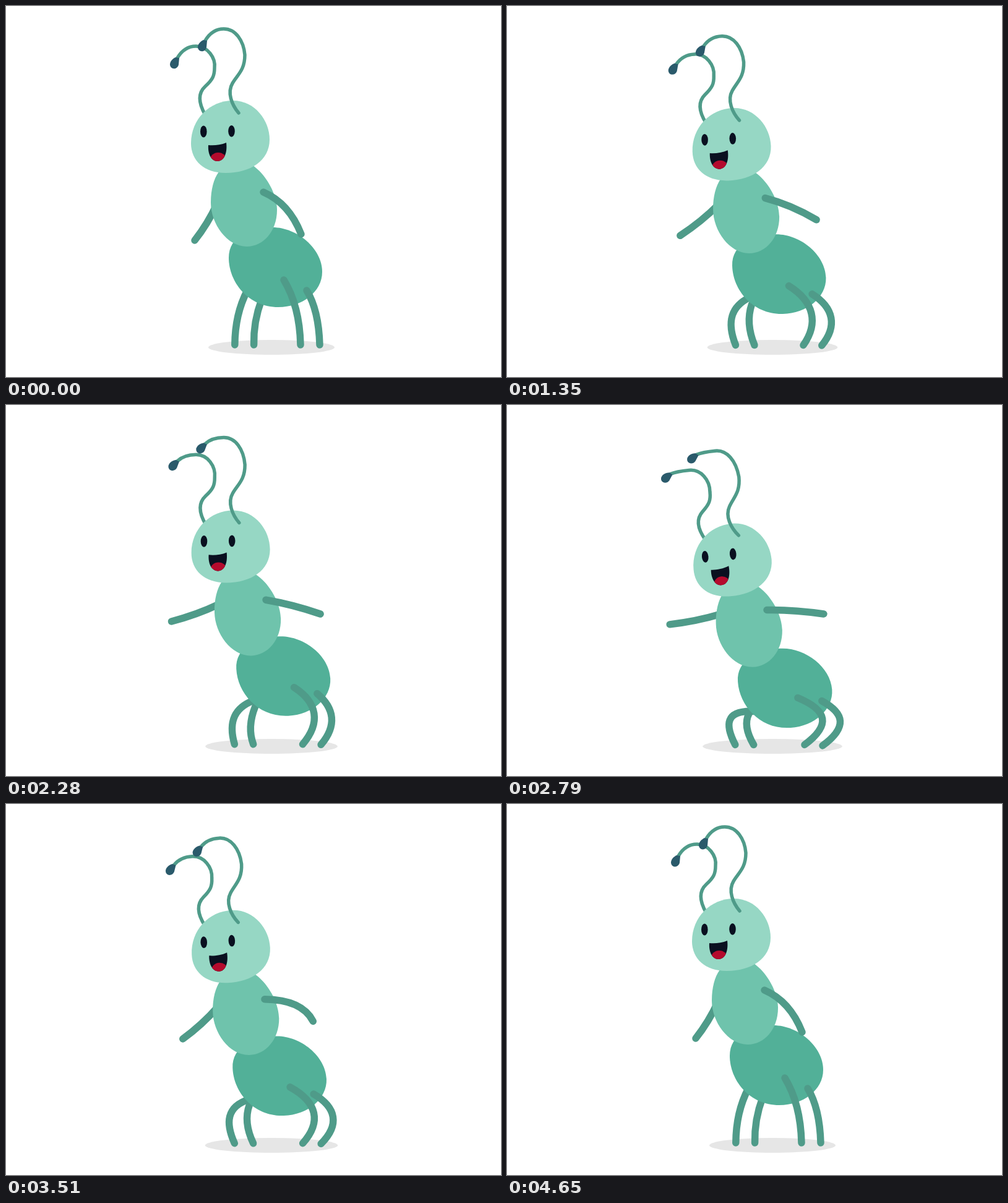
An HTML page with a canvas that plays this animation: 800x600 px, repeating every 4680 ms.

```html
<!DOCTYPE html>
<html>
<head>
<meta charset="utf-8">
<style>
html, body { margin: 0; width: 100%; height: 100%; overflow: hidden; background: #fff; }
canvas { display: block; }
</style>
</head>
<body>
<canvas id="stage" width="800" height="600"></canvas>
<script>
const ctx = document.getElementById('stage').getContext('2d');
const LOOP = 4680, STEP = 30;
const LIMB = '#4f9b89', DARK = '#0a1020', TIP = '#2a5a6b';

// Squat depth: [time, depth], eased between extremes
const SQUATS = [[0, 0], [210, .95], [530, -.15], [1050, 0], [1100, 0], [1250, 1], [1410, 0],
  [1625, 1], [1838, 0], [2015, 1], [2192, 0], [2382, 1], [2580, 0], [2775, 1],
  [2950, 0], [3110, 1], [3260, 0], [3415, 1], [3600, 0], [LOOP, 0]];

const ABDOMEN = new Path2D('M360 407C360 372 395 358 431 358C470 358 511 392 511 430C511 462 479 487 440 487C392 487 360 447 360 407Z');
const THORAX = new Path2D('M331 318C331 275 350 252 374 250C405 248 438 295 438 330C438 364 416 389 389 389C357 389 331 352 331 318Z');
const HEAD = new Path2D('M299 222C299 183 329 153 367 153C402 153 426 185 426 216C426 250 395 270 355 270C320 270 299 250 299 222Z');
const MOUTH = new Path2D('M327 225C335 226 347 225 356 221C358 237 353 251 342 251C331 251 326 238 327 225Z');
const BULB = new Path2D('M-3 -1L3 0L2 11C0 19-11 20-12 11C-12 5-7 1-3 -1Z');

function ramp(t, from, to) {
  const p = Math.min(1, Math.max(0, (t - from) / (to - from)));
  return (1 - Math.cos(Math.PI * p)) / 2;
}

function depthAt(t) {
  const i = Math.max(1, SQUATS.findIndex(key => key[0] >= t));
  const [t0, d0] = SQUATS[i - 1], [t1, d1] = SQUATS[i];
  return d0 + (d1 - d0) * ramp(t, t0, t1);
}

function fill(path, color) {
  ctx.fillStyle = color;
  ctx.fill(path);
}

function oval(x, y, rx, ry, color) {
  ctx.fillStyle = color;
  ctx.beginPath();
  ctx.ellipse(x, y, rx, ry, 0, 0, 7);
  ctx.fill();
}

function line(d, width) {
  ctx.strokeStyle = LIMB;
  ctx.lineWidth = width;
  ctx.lineCap = 'round';
  ctx.stroke(new Path2D(d));
}

function placed(dx, dy, degrees, cx, cy, draw) {
  ctx.save();
  ctx.translate(cx + dx, cy + dy);
  ctx.rotate(degrees * Math.PI / 180);
  ctx.translate(-cx, -cy);
  draw();
  ctx.restore();
}

// The last bend of an antenna rises and uncurls by lift
function antenna(stem, topX, restY, lift) {
  const topY = restY - lift * .2;
  const x = topX - 30, y = topY + 19 - lift * .85;
  line(`${stem}C${topX + 32} ${topY + 19} ${topX + 19} ${topY} ${topX} ${topY}
    C${topX - 14} ${topY} ${topX - 24} ${topY + 9 - lift * .42} ${x} ${y}`, 5.5);
  placed(x, y, lift * 1.5, 0, 0, () => fill(BULB, TIP));
}

function draw(t) {
  const d = depthAt(t);
  const r = d > 0 ? d ** .45 : d;
  const s = ramp(t, 1110, 1750) - ramp(t, 3280, 3730);
  const arms = ramp(t, 250, 520) - ramp(t, 650, 1020) + ramp(t, 1110, 1470) - ramp(t, 3300, 3760);
  const drop = t > 3000 ? 4 * s * (1 - s) : 0;
  const lift = 20 * depthAt(Math.min(LOOP, t + 10));
  const inHead = part => placed(1.5 * d, 39.5 * d, 4.2 * s - 9 * d, 363, 211.5, part);

  ctx.fillStyle = '#fff';
  ctx.fillRect(0, 0, 800, 600);
  oval(429, 552, 102 + 11 * d, 12, '#e6e6e6');

  inHead(() => placed(0, 0, -.06 * lift, 322, 176, () =>
    antenna('M322 176C311 157 310 141 322 130C334 119 337 113 337 100', 307, 65, lift)));

  // Far arm and far legs
  const sx = 341 + 3 * s, sy = 320 - 11 * arms + 30 * d;
  const hx = 305 - 34 * arms ** 1.4 - 8 * d, hy = 379 - 33 * arms ** 4 + 9 * d;
  line(`M${sx} ${sy}Q${(sx + hx) / 2 + 3} ${(sy + hy) / 2 + 3} ${hx} ${hy}`, 11.5);
  line(`M${390 + 13 * s - 5 * d} ${460 + 3 * s + 33 * d}
    C${377 + 15 * s - 40 * r} ${485 + 4 * s + 5 * d} ${370 + 10 * s - 28 * r} ${515 + 4 * s - 2 * d} ${369.8 - d} ${548 + 1.5 * d}`, 11.5);
  line(`M${413 + 16 * s - 38 * r} ${475 + 4 * s + 20 * d}
    C${404 + 13 * s - 33 * r} ${499 + 8 * s + 5 * d} ${400 + 6 * s - 19 * r} ${524 + 6 * s} ${400.6 - 2 * d} ${548 + 1.5 * d}`, 11.5);

  placed(12 * s + 2 * d, 36 * d, -2 * s - 2 * d, 436, 422, () => fill(ABDOMEN, '#52b098'));

  // Near legs
  line(`M${449 + 13 * s + 8 * d} ${443 + 31 * d}
    C${466 + 3 * s + 50 * r} ${471 + 23 * d} ${475 + 49 * r} ${506 + 12 * r} ${476 + 5 * r} ${548 + 1.5 * d}`, 11.5);
  line(`M${486 + 12 * s + 11 * d} ${460 - 3 * s + 22 * d}
    C${500 - 4 * s + 50 * r} ${483 + 16 * d} ${506 - 6 * s + 51 * r} ${513 + 8 * r} ${507 + 3 * r} ${548 + 3 * d}`, 11.5);

  placed(5.5 * s + 1.2 * d, 34 * d + 1.5 * s, -s, 384, 320, () => fill(THORAX, '#6fc3ac'));

  inHead(() => {
    fill(HEAD, '#96d7c4');
    oval(319.3, 203, 5.3, 9.4, DARK);
    oval(364.5, 202.3, 5.3, 9.4, DARK);
    fill(MOUTH, DARK);
    ctx.save();
    ctx.clip(MOUTH);
    oval(343, 248.5, 13, 11.5, '#b40a2d');
    ctx.restore();
    placed(0, 0, -.06 * lift, 376, 173, () =>
      antenna('M376 173C365 160 357 140 366 125C374 111 386 104 386 79', 352, 37, lift));
  });

  // Near arm
  line(`M${416 + 4 * s} ${301 + 30 * d + s}
    Q${457.5 + 6 * s + 18 * drop} ${319 - 3 * arms + 15 * d - 8 * drop} ${477 + 28 * arms + 7 * d} ${369 - 31 * arms}`, 11.5);
}

const start = performance.now();
function tick() {
  const t = (performance.now() - start) % LOOP;
  draw(Math.floor(t / STEP) * STEP);
  requestAnimationFrame(tick);
}
tick();
</script>
</body>
</html>
```
